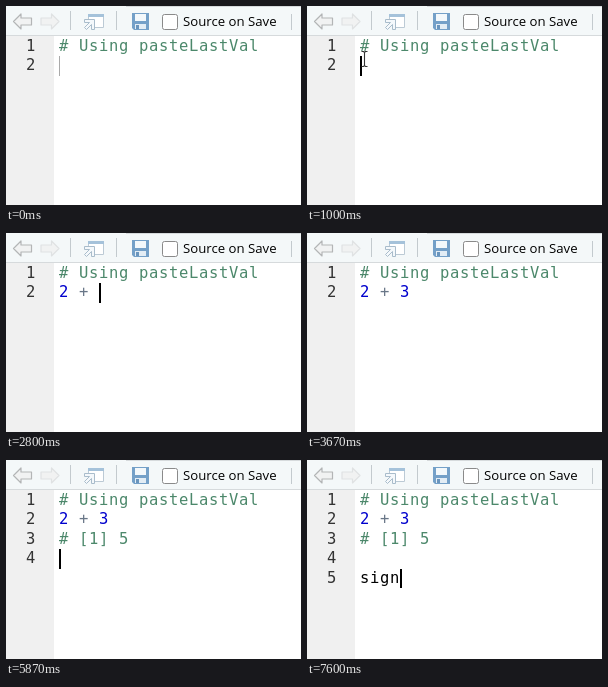
An HTML page that plays this animation: 295 by 199 pixels, repeating every 8000 ms.

```html
<!DOCTYPE html>
<html lang="en">
<head>
<meta charset="utf-8">
<title>Typing in a code editor</title>
<style>
  html, body { margin: 0; width: 100%; height: 100%; overflow: hidden; background: #fff; }
  svg { display: block; width: 295px; height: 199px; }
  .code { font: 15.5px "DejaVu Sans Mono", monospace; letter-spacing: .67px; white-space: pre; }
  .label { font: 13.2px "Open Sans", "Noto Sans", sans-serif; fill: #000; }
  .comment { fill: #4c886b; }
  .number { fill: #0000cd; }
  .operator { fill: #687687; }
  .gutter { fill: #333; }
</style>
</head>
<body>
<svg viewBox="0 0 295 199" xmlns="http://www.w3.org/2000/svg">
  <rect width="295" height="199" fill="#fff"/>
  <rect y="30" width="48" height="169" fill="#f0f0f0"/>

  <!-- toolbar -->
  <rect width="295" height="30" fill="#f4f8f9"/>
  <path d="M120 .5H295" stroke="#d6dadc"/>
  <path d="M0 29.5H295" stroke="#d6dadc"/>
  <path d="M64.5 5V24M110.5 5V24M285.5 8V24" stroke="#c3cace"/>
  <g fill="#f1f2f2" stroke-linejoin="round" stroke-width="1.2">
    <path d="M7.5 15.5L15 8V12H25.5V19H15V23Z" stroke="#b3b5b6"/>
    <path d="M53 15.5L45.5 8V12H35V19H45.5V23Z" stroke="#dfe2e3"/>
  </g>
  <g fill="none">
    <path d="M82.5 13V8.5H97.5V21.5H89" fill="#fff" stroke="#bccad5"/>
    <path d="M82 9.5H98" stroke="#a5c2da" stroke-width="3"/>
    <path d="M78.5 16.5V13.5H88.5V23.5H85.5V18.5L80.5 23.5L78.5 21.5L83.5 16.5Z" fill="#f4f8fb" stroke="#a9bccb"/>
  </g>
  <path d="M126 7H143V24H128L126 22Z" fill="#74a0c8"/>
  <rect x="129" y="8" width="11" height="7" fill="#f3f8fb"/>
  <rect x="129" y="18" width="11" height="5" fill="#e3edf5"/>
  <rect x="130" y="19" width="3" height="4" fill="#6a95bd"/>
  <rect x="156.5" y="8.5" width="15" height="15" rx="2" fill="#fff" stroke="#8a8a8a"/>
  <text class="label" x="177" y="20">Source on Save</text>

  <g id="lines"></g>
  <rect id="caret"/>
  <path id="pointer" fill="none" stroke="#333" stroke-width="1.1"
    d="M-3 -7.5H-1L0 -6.5L1 -7.5H3M0 -6.5V6.5M-3 7.5H-1L0 6.5L1 7.5H3"/>
</svg>
<script>
const LOOP = 8000;
const FRAME = 200 / 3;
const LEFT = 53, ADVANCE = 10, LINE = 19.5, TOP = 30.5;
const svgNS = "http://www.w3.org/2000/svg";
const $ = id => document.getElementById(id);

// Each run: text, style, row, column, time it appears
const runs = [
  ["# Using pasteLastVal", "comment", 0, 0, 0],
  ["2", "number", 1, 0, 1730],
  ["+", "operator", 1, 2, 2670],
  ["3", "number", 1, 4, 3070],
  ["# [1] 5", "comment", 2, 0, 5130],
  ["s", "", 4, 0, 7070],
  ["i", "", 4, 1, 7330],
  ["g", "", 4, 2, 7470],
  ["n", "", 4, 3, 7600]
];
const rowTimes = [0, 0, 4000, 5870, 6470];

// Caret states: time, row, column, visible
const carets = [
  [0, 1, 0, 1], [1530, 1, 0, 0], [1730, 1, 1, 1], [1930, 1, 2, 1],
  [2530, 1, 2, 0], [2670, 1, 3, 1], [2800, 1, 4, 1], [3070, 1, 5, 1],
  [3670, 1, 5, 0], [4000, 2, 0, 1], [4530, 2, 0, 0], [4930, 2, 0, 1],
  [5130, 2, 7, 1], [5670, 2, 7, 0], [5870, 3, 0, 1], [6470, 4, 0, 1],
  [7070, 4, 1, 1], [7330, 4, 2, 1], [7470, 4, 3, 1], [7600, 4, 4, 1]
];
const focusTime = 1000;
const move = { start: 330, end: 1330, steps: 6, from: [45.5, 122], to: [57.5, 53] };

const rowTop = row => TOP + row * LINE;

function set(el, attrs) {
  for (const name in attrs) el.setAttribute(name, attrs[name]);
}

function addText(text, style, row, x, time) {
  const el = document.createElementNS(svgNS, "text");
  set(el, { class: "code " + style, x, y: Math.floor(rowTop(row) + 14.5) });
  el.textContent = text;
  $("lines").append(el);
  return { el, time };
}

const parts = [
  ...runs.map(([text, style, row, col, time]) =>
    addText(text, style, row, LEFT + col * ADVANCE, time)),
  ...rowTimes.map((time, row) => addText(row + 1, "gutter", row, 20, time))
];

function drawCaret(t) {
  const [, row, col, visible] = carets.findLast(c => c[0] <= t);
  const focused = t >= focusTime;
  const y = Math.round(rowTop(row));
  set($("caret"), {
    x: LEFT + col * ADVANCE,
    y,
    width: focused ? 2 : 1,
    height: Math.round(rowTop(row + 1)) - y,
    fill: focused ? "#000" : "#aaa",
    visibility: visible ? "visible" : "hidden"
  });
}

function drawPointer(t) {
  const { start, end, steps, from, to } = move;
  const step = Math.floor((t - start + 1) / FRAME);
  const p = Math.min(1, Math.max(0, step / steps));
  const ease = 1 - (1 - p) ** 2;
  const [x, y] = from.map((a, i) => a + (to[i] - a) * ease);
  set($("pointer"), {
    transform: `translate(${x} ${y})`,
    visibility: t >= start && t < end ? "visible" : "hidden"
  });
}

function draw(t) {
  for (const { el, time } of parts) {
    el.setAttribute("visibility", t >= time ? "visible" : "hidden");
  }
  drawCaret(t);
  drawPointer(t);
}

const begin = performance.now();
function tick() {
  draw((performance.now() - begin) % LOOP);
  requestAnimationFrame(tick);
}
tick();
</script>
</body>
</html>
```
